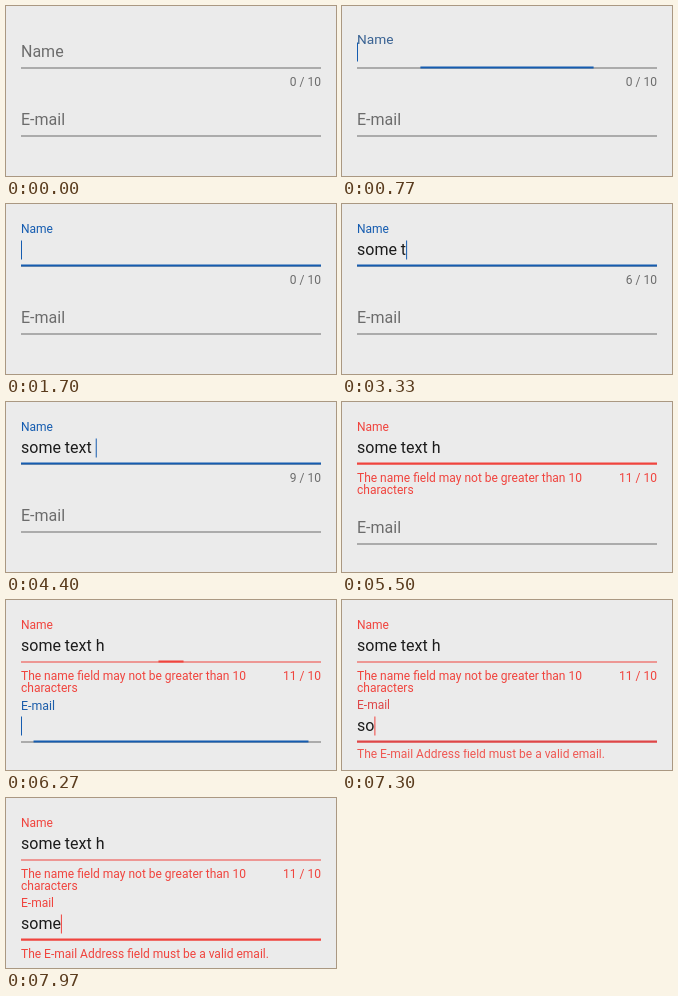
An HTML page for the animation above (8000 ms loop, 330 px wide and 170 px high).

```html
<!DOCTYPE html>
<html lang="en">
<head>
<meta charset="utf-8">
<title>Form validation</title>
<style>
  html, body { margin: 0; width: 100%; height: 100%; overflow: hidden; background: #ebebeb; }
  svg { display: block; width: 100%; height: 100%; }
  text { font-family: Roboto, Arial, sans-serif; white-space: pre; }
</style>
</head>
<body>
<svg id="stage" viewBox="0 0 330 170"></svg>
<script>
const LOOP = 8000, LEFT = 15, WIDTH = 300, MOVE = 300, BLINK = 500;
const GREY = [108, 108, 108], BLUE = [21, 92, 176], RED = [240, 68, 62];
const stage = document.getElementById('stage');

function add(parent, tag, attrs) {
  const el = document.createElementNS('http://www.w3.org/2000/svg', tag);
  return parent.appendChild(set(el, attrs));
}
function set(el, attrs) {
  for (const k in attrs) el.setAttribute(k, attrs[k]);
  return el;
}
const rgb = c => `rgb(${c.map(Math.round)})`;
const mix = (a, b, p) => a.map((v, i) => v + (b[i] - v) * p);

// cubic-bezier(.25, .8, .5, 1)
function ease(x) {
  if (x <= 0) return 0;
  if (x >= 1) return 1;
  const curve = (s, a, b) => 3 * (1 - s) * (1 - s) * s * a + 3 * (1 - s) * s * s * b + s * s * s;
  let lo = 0, hi = 1;
  for (let i = 0; i < 24; i++) {
    const mid = (lo + hi) / 2;
    if (curve(mid, .25, .5) < x) lo = mid; else hi = mid;
  }
  return curve(lo, .8, 1);
}
const after = (t, start) => ease((t - start) / MOVE);

function makeField(spec) {
  const g = add(stage, 'g', {});
  const clip = add(add(g, 'clipPath', { id: spec.id }), 'rect', { x: 0, y: 69, width: 330, height: 40 });
  const field = {
    ...spec, g, clip,
    label: add(g, 'text', { y: 15.5, 'font-size': 16 }),
    value: add(g, 'text', { x: LEFT, y: 50.5, 'font-size': 16, fill: '#1c1c1c' }),
    caret: add(g, 'rect', { y: 36.5, width: 1, height: 19 }),
    rule: add(g, 'rect', { x: LEFT, y: 61.5, width: WIDTH, height: 1 }),
    bar: add(g, 'rect', { y: 60.5, height: 2 }),
    note: add(add(g, 'g', { 'clip-path': `url(#${spec.id})` }), 'g', { fill: rgb(RED) })
  };
  field.label.textContent = spec.name;
  spec.message.forEach((line, i) => {
    add(field.note, 'text', { x: LEFT, y: 79.5 + 12 * i, 'font-size': 12 }).textContent = line;
  });
  if (spec.limit) field.counter = add(g, 'text', { x: 315, y: 79.5, 'font-size': 12, 'text-anchor': 'end' });
  return field;
}

function drawField(f, t, top) {
  const focus = after(t, f.focus), blur = after(t, f.blur), error = after(t, f.error + 10);
  const typed = f.keys.filter(k => k <= t);
  const accent = mix(BLUE, RED, error);
  const invalid = t >= f.error;
  const scale = 1 - .25 * focus;

  set(f.g, { transform: `translate(0 ${top})` });
  set(f.label, {
    transform: `translate(${LEFT} ${35 - 18 * focus}) scale(${scale})`,
    fill: rgb(mix(mix(GREY, BLUE, focus), RED, error))
  });

  f.value.textContent = f.text.slice(0, typed.length);
  const reset = typed.length ? typed[typed.length - 1] : f.focus;
  const shown = t >= f.focus && t < f.blur && Math.floor((t - reset) / BLINK) % 2 === 0;
  const end = typed.length ? f.value.getComputedTextLength() : 0;
  set(f.caret, { x: LEFT + end, fill: rgb(invalid ? RED : BLUE), opacity: shown ? 1 : 0 });

  const width = WIDTH * focus * (1 - blur);
  set(f.rule, { fill: rgb(mix(GREY, RED, error)) });
  set(f.bar, { x: LEFT + (WIDTH - width) / 2, width, fill: rgb(accent) });

  const slide = after(t, f.error + 30);
  set(f.note, { transform: `translate(0 ${-15 * (1 - slide)})`, opacity: slide });

  if (f.counter) {
    const count = f.keys.filter(k => k + 30 <= t).length;
    f.counter.textContent = `${count} / ${f.limit}`;
    set(f.counter, { fill: rgb(invalid ? RED : GREY) });
  }
}

const nameField = makeField({
  id: 'nameNote', name: 'Name', text: 'some text h', limit: 10,
  keys: [1770, 1870, 2000, 2130, 3200, 3300, 3500, 3770, 3970, 4400, 4970],
  focus: 700, blur: 6100, error: 4970,
  message: ['The name field may not be greater than 10', 'characters']
});
const mailField = makeField({
  id: 'mailNote', name: 'E-mail', text: 'some',
  keys: [7130, 7240, 7400, 7500],
  focus: 6100, blur: Infinity, error: 7120,
  message: ['The E-mail Address field must be a valid email.']
});

function draw(t) {
  drawField(nameField, t, 0);
  drawField(mailField, t, t < nameField.error ? 68 : 80);
}
function tick() {
  draw(performance.now() % LOOP);
  requestAnimationFrame(tick);
}
tick();
</script>
</body>
</html>
```
